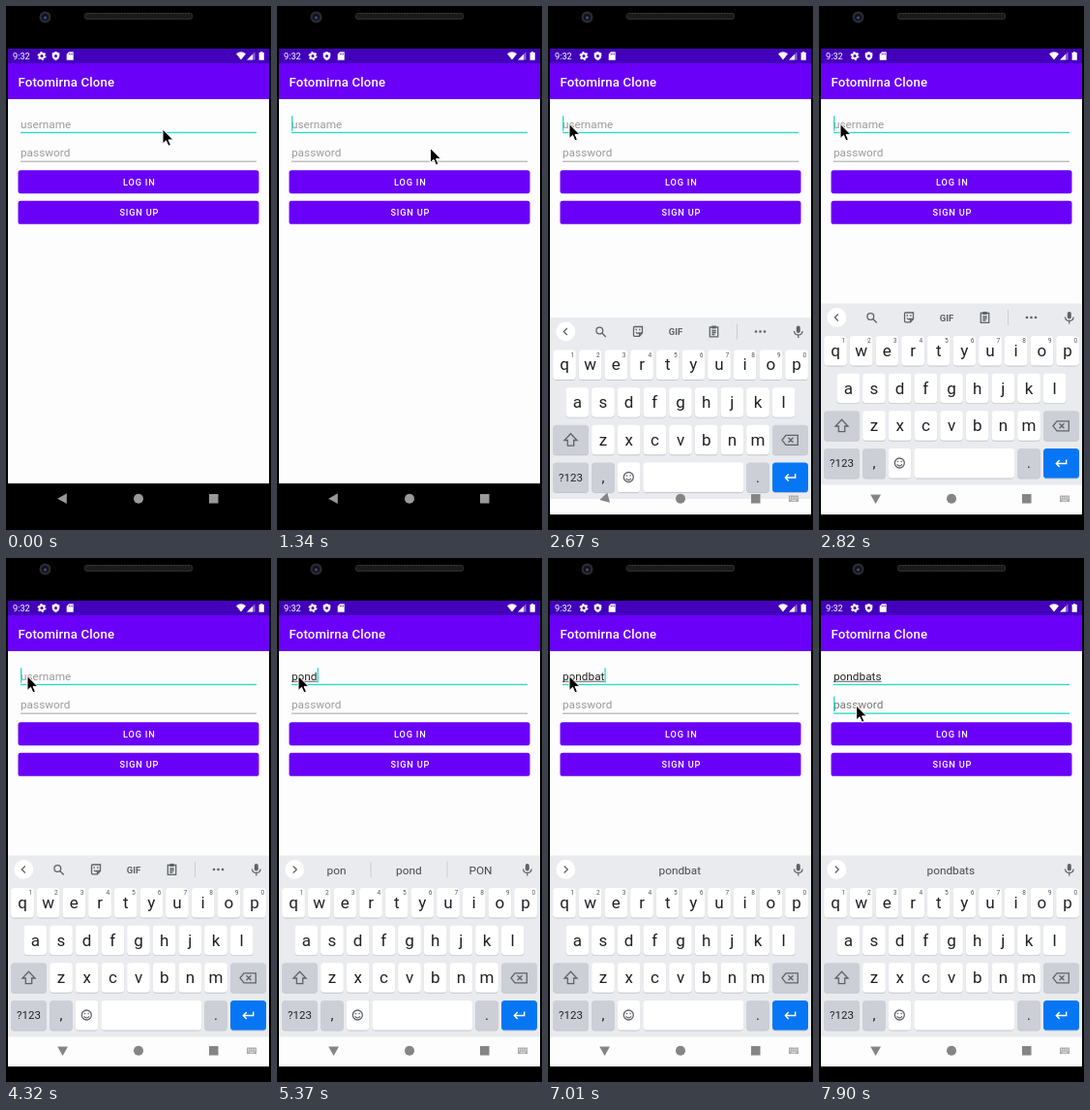
An HTML page for the animation above (8000 ms loop, 274x540 px).

```html
<!DOCTYPE html>
<html lang="en">
<head>
<meta charset="utf-8">
<title>Login screen</title>
<style>
html, body { margin: 0; width: 100%; height: 100%; overflow: hidden; background: #000; }
svg { display: block; width: 274px; height: 540px; font-family: Roboto, sans-serif; }
.mid { text-anchor: middle; }
.line { fill: none; stroke: #5f6368; stroke-width: 1.3; }
.gray { fill: #5f6368; }
.btn { fill: #fff; font-size: 9.2px; font-weight: 500; letter-spacing: .82px; text-anchor: middle; }
.field { font-size: 11.8px; }
.sug { font-size: 11.8px; fill: #45484d; text-anchor: middle; }
</style>
</head>
<body>
<svg viewBox="0 0 274 540">
  <defs>
    <clipPath id="screen"><rect x="2" y="44" width="270" height="480"/></clipPath>
    <pattern id="mesh" width="3" height="3" patternUnits="userSpaceOnUse">
      <rect width="3" height="3" fill="#111"/><path d="M0 0L3 3M3 0L0 3" stroke="#2c2c2c" stroke-width=".6"/>
    </pattern>
  </defs>
  <rect width="274" height="540"/>
  <circle cx="40.500" cy="11.500" r="6" fill="#2b2b2d"/>
  <circle cx="40.500" cy="11.500" r="3.600" fill="#10121c"/>
  <circle cx="40.500" cy="12" r="1.600" fill="#35508f"/>
  <rect x="81.500" y="7.500" width="111" height="6" rx="2" fill="url(#mesh)" stroke="#303030"/>

  <g clip-path="url(#screen)">
    <rect x="2" y="44" width="270" height="448" fill="#fdfdfd"/>
    <rect x="2" y="44" width="270" height="15.500" fill="#4300bb"/>
    <rect x="2" y="59" width="270" height="37" fill="#6a00f8"/>
    <g fill="#fff">
      <text x="7" y="54.700" font-size="9.200">9:32</text>
      <circle cx="37" cy="51.500" r="2.500" fill="none" stroke="#fff" stroke-width="1.800"/>
      <circle cx="37" cy="51.500" r="3.900" fill="none" stroke="#fff" stroke-width="1.200" stroke-dasharray="2 2.084"/>
      <path d="M51.500 47L55.300 48.500V51.500Q55 54.800 51.500 56Q48 54.800 47.700 51.500V48.500Z"/>
      <circle cx="51.500" cy="51.400" r="1.500" fill="#4300bb"/>
      <path d="M65 47.300H69.700V55.700H62.700V49.700Z"/>
      <path d="M65.300 48.600V50.400M66.900 48.600V50.400M68.400 48.600V50.400" stroke="#4300bb" stroke-width=".7"/>
      <path d="M238 49.200Q243 45.200 248 49.200L243 55.500Z"/>
      <path d="M257.500 47.200V55.500H249.200Z" opacity=".4"/>
      <path d="M255 49.700V55.500H249.200Z"/>
      <path d="M263 47H265.300V47.900H266.800V55.700H261.600V47.900H263Z"/>
      <text x="12.500" y="82.700" font-size="13.200" font-weight="500" letter-spacing=".15">Fotomirna Clone</text>
    </g>

    <text id="user" class="field" x="15" y="125.500"></text>
    <rect id="compose" x="15" y="126.800" height=".8" fill="#333"/>
    <rect x="15" y="129.800" width="244" height="1.300" fill="#25dbc8"/>
    <text id="pass" class="field" x="15" y="155.300">password</text>
    <rect id="passLine" x="15" width="244"/>
    <rect id="caret" width="1.300" height="15.500" fill="#25dbc8"/>
    <g fill="#6a00f8">
      <rect x="12.500" y="169.200" width="249" height="24" rx="2.600"/>
      <rect x="12.500" y="200.800" width="249" height="24" rx="2.600"/>
    </g>
    <text class="btn" x="137.800" y="184.600">LOG IN</text>
    <text class="btn" x="137.800" y="216.200">SIGN UP</text>

    <rect id="navBg" x="2" y="492" width="270" height="32" fill="#fdfdfd"/>
    <g id="board">
      <rect x="2" y="306.500" width="270" height="187" fill="#e9ebef"/>
      <circle cx="18.300" cy="321" r="10" fill="#fff"/>
      <path id="chevron" class="line"/>
      <g id="tools">
        <circle class="line" cx="53.300" cy="320" r="3.400"/>
        <path class="line" d="M55.800 322.500L59.800 326.500"/>
        <path class="line" d="M89.500 316H97.500V322.500L94.500 325.800H89.500Q88.500 325.800 88.500 324.800V317Q88.500 316 89.500 316ZM97.500 322.500H94.500V325.800M91 321.500Q92.500 324 94.300 322"/>
        <path class="gray" d="M90.500 318.300H92V319.800H90.500ZM94 318.300H95.500V319.800H94Z"/>
        <text class="mid gray" x="132" y="324.500" font-size="9.500" font-weight="700">GIF</text>
        <path class="line" d="M167.300 316.500H175.700V326.300H167.300ZM169.300 320H173.700M169.300 322H173.700M169.300 324H172.500"/>
        <rect class="gray" x="169.300" y="315" width="4.400" height="3"/>
        <rect x="195" y="313" width="1" height="16" fill="#c9ccd1"/>
        <g class="gray"><circle cx="215" cy="321" r="1.300"/><circle cx="219.500" cy="321" r="1.300"/><circle cx="224" cy="321" r="1.300"/></g>
      </g>
      <path id="split" d="M97 313V329M176 313V329" stroke="#c9ccd1"/>
      <text class="sug" x="61.500" y="325.500"></text>
      <text class="sug" x="136.300" y="325.500"></text>
      <text class="sug" x="210.500" y="325.500"></text>
      <rect class="gray" x="256.800" y="315" width="4" height="7.500" rx="2"/>
      <path class="line" d="M254.500 320.500Q254.800 324.500 258.800 324.500Q262.800 324.500 263.100 320.500M258.800 324.500V327.500"/>
      <g id="keys"></g>
      <path class="line" d="M23.500 426.300L30 433H26.700V438.700H20.300V433H17Z"/>
      <path class="line" d="M246 427.800H258.300V437.800H246L242 432.800ZM248.500 430.300L253.500 435.300M253.500 430.300L248.500 435.300"/>
      <circle class="line" cx="83.300" cy="471" r="5"/>
      <path class="line" d="M80.600 472.300Q83.300 475.500 86 472.300" stroke-width="1"/>
      <g class="gray"><circle cx="81.500" cy="469.500" r=".8"/><circle cx="85.100" cy="469.500" r=".8"/></g>
      <path d="M255.700 467.500V471.500H245.500M248.800 468L245.300 471.500L248.800 475" fill="none" stroke="#fff" stroke-width="1.400"/>
    </g>
    <g id="nav">
      <path id="back" d="M53.200 507.700L62.800 502.300V513.100Z"/>
      <circle cx="137" cy="507.700" r="5"/>
      <rect x="210" y="503" width="9.500" height="9.500"/>
    </g>
    <g id="mini">
      <rect x="249" y="504.500" width="10" height="6.500" fill="#aaa"/>
      <path d="M250 506.300H258M250 508H258" stroke="#fff" stroke-width=".8" stroke-dasharray="1 .75"/>
      <path d="M251.500 509.700H256.500" stroke="#fff" stroke-width=".7"/>
    </g>
  </g>
  <path id="pointer" d="M0 0V15L3.500 11.800L5.900 17.300L8.400 16.200L6 10.900H10.900Z" stroke="#fff" stroke-width="1" stroke-linejoin="round"/>
</svg>
<script>
const $ = id => document.getElementById(id);
const NS = 'http://www.w3.org/2000/svg';
const PERIOD = 8000;

function add(tag, attrs, text = '') {
  const el = document.createElementNS(NS, tag);
  for (const k in attrs) el.setAttribute(k, attrs[k]);
  el.textContent = text;
  $('keys').append(el);
}

function key(cx, y, w, label, fill = '#fff', size = 17) {
  const box = { x: cx - w / 2, width: w, height: 30.5, rx: 3.6 };
  add('rect', { ...box, y: y + 0.9, fill: '#c3c6cc' });
  add('rect', { ...box, y, fill });
  add('text', { class: 'mid', x: cx, y: y + 15.2 + size * 0.34, 'font-size': size, fill: '#202124' }, label);
}

const PITCH = 26.67, DARK = '#cccfd6';
[['qwertyuiop', 17, 340], ['asdfghjkl', 30.3, 378.7], ['zxcvbnm', 57, 417.3]].forEach(([row, x, y]) =>
  [...row].forEach((c, i) => key(x + i * PITCH, y, 23.7, c)));
[...'1234567890'].forEach((n, i) =>
  add('text', { class: 'mid', x: 25.3 + i * PITCH, y: 347.3, 'font-size': 6.6, fill: '#55585d' }, n));
key(23.5, 417.3, 37, '', DARK);
key(250.5, 417.3, 37, '', DARK);
key(23.5, 456, 37, '?123', DARK, 11.5);
key(57, 456, 23.7, ',', DARK, 15);
key(83.5, 456, 23.7, '');
key(150.3, 456, 104, '');
key(217, 456, 23.7, '.', DARK, 15);
key(250.5, 456, 37, '', '#0676f4');

// Each step holds until the next; omitted fields carry over.
const steps = [
  [0, { at: [162, 127], caret: 0, text: '', sug: [], drop: 999, turn: 0, pass: 0 }],
  [150, { at: [161.6, 127.4] }],
  [450, { at: [163, 129], caret: 1 }],
  [600, { at: [163.5, 135] }],
  [740, { at: [162, 142] }],
  [890, { at: [160, 146], caret: 0 }],
  [1340, { at: [158.5, 146.5], caret: 1 }],
  [1490, { at: [140, 142] }],
  [1640, { at: [94, 132] }],
  [1790, { at: [50, 125], caret: 0 }],
  [1930, { at: [18, 121] }],
  [2080, { at: [9, 120] }],
  [2220, { at: [15, 121], caret: 1 }],
  [2370, { at: [22, 121.5] }],
  [2520, { drop: 110 }],
  [2670, { drop: 14.5, turn: -15 }],
  [2820, { drop: 0, turn: -90 }],
  [2970, { caret: 0 }],
  [3420, { caret: 1 }],
  [3870, { caret: 0 }],
  [4320, { caret: 1 }],
  [4770, { caret: 0 }],
  [4920, { caret: 1, text: 'p', sug: ['put', 'p', 'pls'] }],
  [5070, { text: 'po', sug: ['pop', 'po', 'PO'] }],
  [5220, { text: 'pon', sug: ['pin', 'pon', 'son'] }],
  [5370, { text: 'pond', sug: ['pon', 'pond', 'PON'] }],
  [5670, { text: 'pondb' }],
  [5820, { sug: ['ponderous', 'pondb', 'ponderings'] }],
  [6410, { caret: 0 }],
  [6560, { caret: 1, text: 'pondba' }],
  [6710, { sug: ['', 'pondba', ''] }],
  [7010, { text: 'pondbat', sug: ['', 'pondbat', ''] }],
  [7160, { text: 'pondbats' }],
  [7310, { sug: ['', 'pondbats', ''] }],
  [7450, { at: [23, 124] }],
  [7600, { at: [28, 133] }],
  [7750, { at: [35, 147] }],
  [7900, { at: [38.5, 152], pass: 1 }]
];

const stateAt = t => Object.assign({}, ...steps.filter(s => s[0] <= t).map(s => s[1]));
const show = (el, on) => el.setAttribute('visibility', on ? 'visible' : 'hidden');
const set = (id, attrs) => { for (const k in attrs) $(id).setAttribute(k, attrs[k]); };
const slots = document.querySelectorAll('.sug');

function draw(t) {
  const s = stateAt(t);
  const open = s.drop < 500, typed = s.text !== '', sugs = s.sug.length > 0;
  set('pointer', { transform: `translate(${s.at})` });

  $('user').textContent = s.text || 'username';
  set('user', { fill: typed ? '#242424' : '#9b9b9b' });
  const end = typed ? $('user').getComputedTextLength() : 0;
  set('compose', { width: end });
  set('caret', { x: 15 + (s.pass ? 0 : end), y: s.pass ? 142.7 : 113.2 });
  show($('caret'), s.caret);
  set('pass', { fill: s.pass ? '#777' : '#9b9b9b' });
  set('passLine', s.pass ? { y: 159.5, height: 1.3, fill: '#25dbc8' } : { y: 159.7, height: 0.9, fill: '#999' });

  show($('board'), open);
  show($('navBg'), open);
  show($('mini'), open);
  set('board', { transform: `translate(0 ${open ? s.drop : 0})` });
  set('nav', { fill: open ? '#858585' : '#999' });
  set('back', { transform: `rotate(${s.turn} 58.6 507.7)` });
  set('chevron', { d: sugs ? 'M16.7 317.5L20.2 321L16.7 324.500' : 'M19.800 317.500L16.300 321L19.800 324.500' });
  show($('tools'), open && !sugs);
  show($('split'), open && s.sug[0]);
  slots.forEach((el, i) => { el.textContent = s.sug[i] || ''; });
}

function frame() {
  draw(performance.now() % PERIOD);
  requestAnimationFrame(frame);
}
frame();
</script>
</body>
</html>
```
